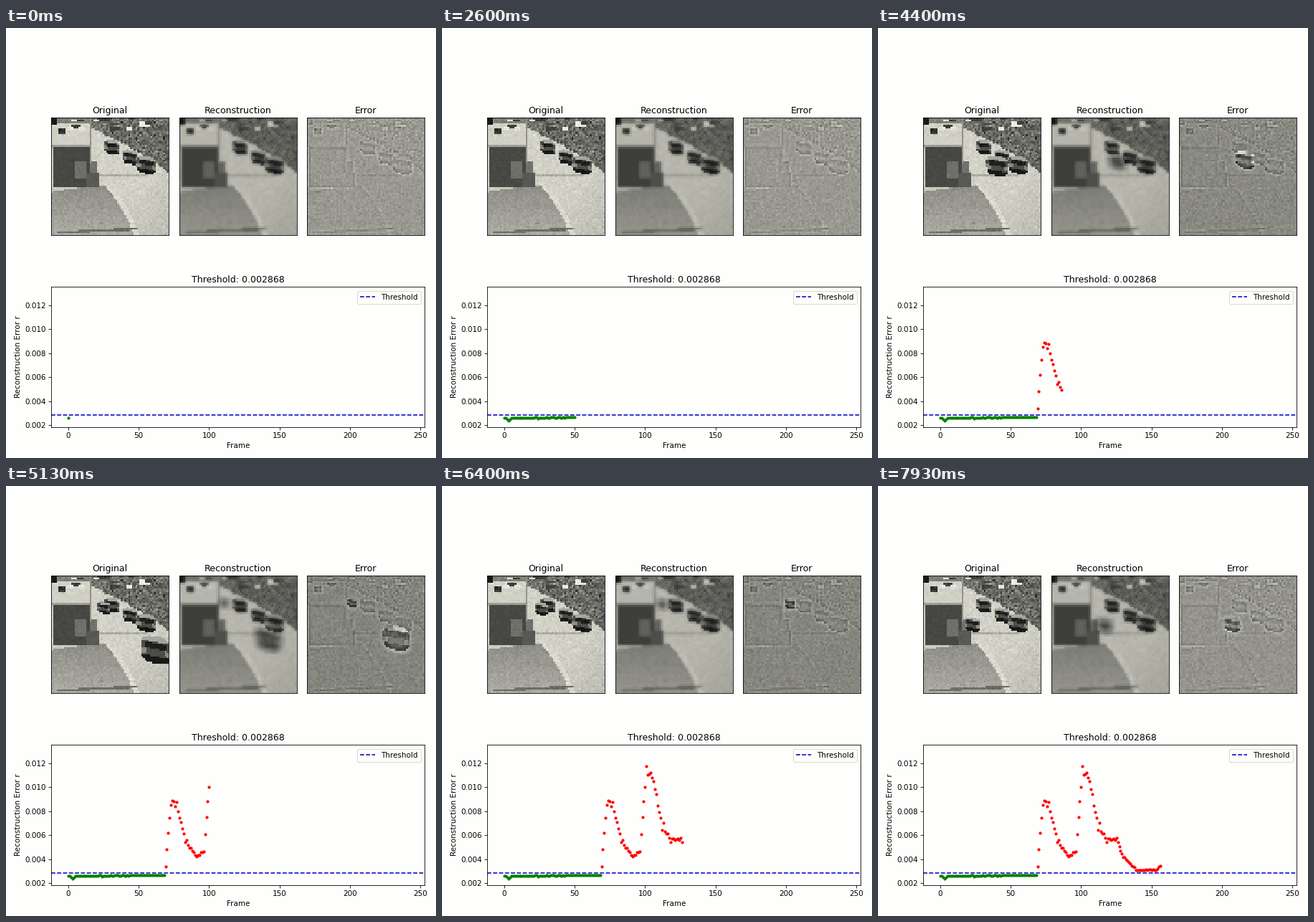
These frames come from a looping animation (600x600 px, 8000 ms). A matplotlib script:

```python
import numpy as np
import matplotlib.pyplot as plt
from matplotlib.animation import FuncAnimation
from matplotlib.path import Path

SIZE, DPI, STEPS, INTERVAL = 600, 75, 160, 50
N = 64
LEFT, TOP, SIDE, PITCH = 63.2, 124.9, 163.9, 178.6
WIDTH = 2 * PITCH + SIDE
PAPER = "#fefefc"
THRESHOLD = 0.002868
LEAD = 5  # the network's output runs this many steps ahead of the view

plt.rcParams.update({"font.family": "DejaVu Sans", "font.size": 10})

# Cell centres of the first picture, in stage pixels
axis = (np.arange(N) + 0.5) * SIDE / N
X, Y = np.meshgrid(LEFT + axis, TOP + axis)
CELLS = np.column_stack([X.ravel(), Y.ravel()])


def rect(img, x0, y0, x1, y1, v):
    img[(X > x0) & (X < x1) & (Y > y0) & (Y < y1)] = v


def inside(*pts):
    return Path(pts).contains_points(CELLS).reshape(N, N)


def patches(img, rng, count, x, y):
    """Scatter small dark and bright blocks over an area."""
    for k in range(count):
        x0, y0 = rng.uniform(*x), rng.uniform(*y)
        rect(img, x0, y0, x0 + rng.uniform(6, 14), y0 + rng.uniform(3, 7),
             0.92 if k % 2 else 0.25)


def blur(img, r):
    p = np.pad(img, r, mode="edge")
    k = 2 * r + 1
    return sum(p[i:i + N, j:j + N] for i in range(k) for j in range(k)) / k**2


def tint(v):
    v = np.clip(v, 0, 1)
    return np.dstack([v, v, 0.95 * v])


def car(img, cx, cy, w, clip=0):
    u = (X - cx) / (w / 2)
    v = (Y - cy) / (0.45 * w) - 0.2 * u
    body = (abs(u)**3 + abs(v)**3 < 1) & (X > clip)
    img[body] = 0.3
    img[body & (v < -0.55)] = 0.65
    img[body & (abs(v + 0.25) < 0.22) & (abs(u) < 0.75)] = 0.12
    img[body & (abs(v - 0.2) < 0.2) & (abs(u) > 0.6)] = 0.55
    img[body & (v > 0.5)] = 0.1


def street():
    rng = np.random.default_rng(4)
    grain = rng.normal(0, 1, (N, N))
    img = 0.82 - 0.08 * np.clip((X + Y - 400) / 110, 0, 1)
    # parking lot at the back
    rect(img, 63, 124, 120, 133, 0.5)
    rect(img, 63, 124, 70, 135, 0.1)
    rect(img, 74, 141, 84, 149, 0.2)
    patches(img, rng, 6, (84, 106), (126, 140))
    # wooded slope
    wood = inside((118, 124), (228, 124), (228, 204), (208, 186), (186, 174),
                  (162, 160), (140, 150), (118, 138))
    img[wood] = 0.42 + 0.07 * grain[wood]
    patches(img, rng, 9, (122, 215), (124, 140))
    # yard and the pale kerb beside it
    yard = inside((62, 222), (113, 217), (140, 221), (158, 240), (172, 262),
                  (183, 290), (62, 290))
    img[yard] = (0.56 + 0.1 * np.clip((Y - 220) / 60, 0, 1))[yard]
    img[inside((134, 215), (142, 217), (163, 240), (176, 262), (186, 290),
               (180, 290), (168, 262), (154, 240))] = 0.86
    img[inside((62, 223), (112, 217), (114, 221), (62, 229))] = 0.78
    img[inside((72, 284), (183, 278), (182, 282), (72, 287))] = 0.42
    rect(img, 130, 205, 200, 208, 0.68)
    for x, y, w in ((148, 166, 22), (174, 180, 22), (196, 191, 28)):
        car(img, x, y, w)
    return img + 0.022 * grain


def garage(img):
    rect(img, 63, 150, 118, 163, 0.82)
    rect(img, 63, 163, 118, 167, 0.62)
    rect(img, 65, 167, 118, 221, 0.28)
    rect(img, 97, 186, 112, 210, 0.44)
    rect(img, 118, 187, 127, 204, 0.45)
    rect(img, 113, 203, 130, 221, 0.35)
    rect(img, 118, 125, 120.6, 188, 0.58)


# Route up the road: steps since entry and position
T = (-4, 1, 9, 18, 31, 43, 55)
ROUTE_X = (264, 222, 188, 164, 137, 112, 80)
ROUTE_Y = (264, 238, 212, 190, 170, 152, 146)

BASE = street()
STILL = BASE.copy()
garage(STILL)
SOFT = 0.4 * STILL + 0.6 * blur(STILL, 1)


def scene(i):
    img = BASE.copy()
    for start in (69, 96):
        s = i - start
        if T[0] <= s <= T[-1]:
            car(img, np.interp(s, T, ROUTE_X), np.interp(s, T, ROUTE_Y),
                np.clip(46 - 0.9 * s, 10, 44))
    garage(img)
    if i > 150:
        car(img, 132 + 1.2 * (i - 156), 193, 22, clip=120)
    return img


def errors():
    rng = np.random.default_rng(1)
    i = np.arange(STEPS)
    calm = 2.58 + 0.09 * i / 68 - 0.2 * np.exp(-((i - 3) / 1.4)**2)
    calm += rng.normal(0, 0.022, STEPS)
    keys = (69, 73, 77, 83, 91, 96, 101, 105, 112, 118, 125, 130, 139, 153, 156)
    vals = (3.4, 8.9, 8.6, 5.6, 4.2, 4.7, 11.6, 11.1, 6.8, 5.6, 5.7, 4.2, 3.1,
            3.1, 3.5)
    alert = np.interp(i, keys, vals)
    alert += rng.normal(0, 0.04, STEPS) * (alert - 2) ** 0.8
    return np.where(i < 69, calm, np.maximum(alert, 2.92)) / 1000


R = errors()

fig = plt.figure(figsize=(SIZE / DPI, SIZE / DPI), dpi=DPI, facecolor=PAPER)


def add_axes(x, y, w, h, title):
    ax = fig.add_axes([x / SIZE, 1 - (y + h) / SIZE, w / SIZE, h / SIZE],
                      facecolor=PAPER)
    ax.set_title(title, fontsize=12)
    return ax


pictures = []
for k, name in enumerate(("Original", "Reconstruction", "Error")):
    ax = add_axes(LEFT + PITCH * k, TOP, SIDE, SIDE, name)
    ax.set_xticks([])
    ax.set_yticks([])
    pictures.append(ax.imshow(np.zeros((N, N, 3)), interpolation="nearest",
                              aspect="auto"))

chart = add_axes(LEFT, 361.3, WIDTH, 195.2, f"Threshold: {THRESHOLD:.6f}")
chart.set_xlim(-12.05, 253.05)
chart.set_ylim(0.00185, 0.01354)
chart.set_xticks(range(0, 251, 50))
chart.set_yticks(np.arange(0.002, 0.0125, 0.002))
chart.set_xlabel("Frame")
chart.set_ylabel("Reconstruction Error r")
chart.axhline(THRESHOLD, color="#0000c8", ls="--", lw=1.5, label="Threshold")
calm_dots, = chart.plot([], [], ".", color="green", ms=6)
alert_dots, = chart.plot([], [], ".", color="red", ms=6)
chart.legend(loc="upper right", facecolor=PAPER, edgecolor="#d4d4b8")


def update(k):
    i = max(0, k - 2)
    rng = np.random.default_rng(100 + i)
    ahead = scene(i + LEAD)
    rebuilt = SOFT + 0.8 * blur(ahead - STILL, 2)
    level = 0.6 - 0.08 * np.clip((R[i] - 0.0026) / 0.003, 0, 1)
    residue = level + 0.7 * (ahead - rebuilt) + rng.normal(0, 0.025, (N, N))
    shown = scene(i) + rng.normal(0, 0.01, (N, N))
    for pic, data in zip(pictures, (shown, 0.87 * rebuilt, residue)):
        pic.set_data(tint(data))

    x, y = np.arange(i + 1), R[:i + 1]
    over = y > THRESHOLD
    calm_dots.set_data(x[~over], y[~over])
    alert_dots.set_data(x[over], y[over])
    return [*pictures, calm_dots, alert_dots]


anim = FuncAnimation(fig, update, frames=STEPS, interval=INTERVAL,
                     repeat=True, repeat_delay=0, blit=False)
plt.show()
```
